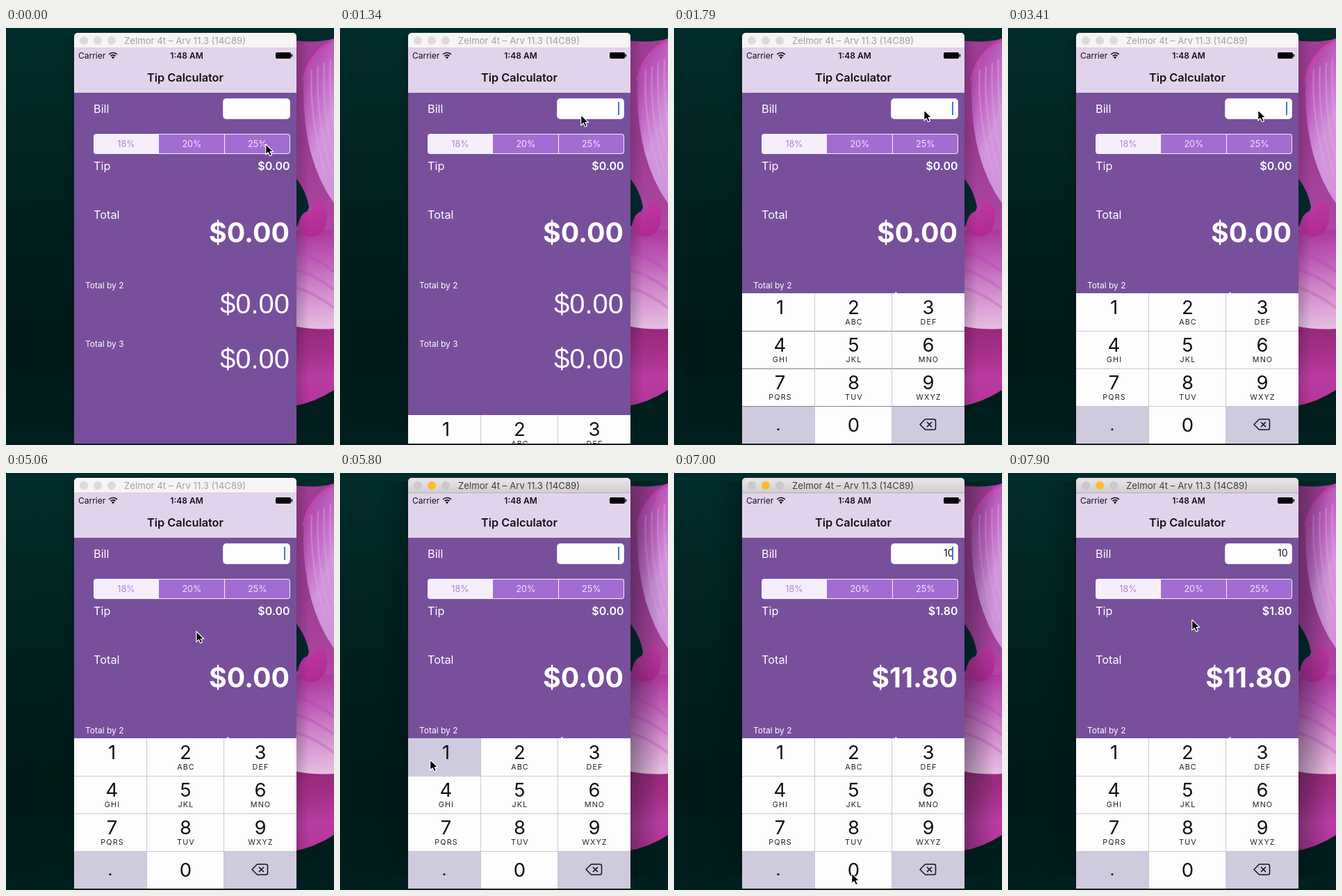
Write an HTML page with a canvas that moves like this. It is 472 by 599 pixels and loops after 8000 ms.

```html
<!DOCTYPE html>
<html lang="en">
<head>
<meta charset="utf-8">
<title>Tip Calculator</title>
<style>
  html, body { margin: 0; width: 100%; height: 100%; overflow: hidden; background: #001c1b; }
  canvas { display: block; width: 472px; height: 599px; }
</style>
</head>
<body>
<canvas id="stage"></canvas>
<script>
const W = 472, H = 599, LOOP = 8000, TICK = 148.9;
const LEFT = 98, WIDTH = 320, BOTTOM = 597;
const SANS = 'Inter, sans-serif';
const INK = '#151217', KEY_GREY = '#cfcade';

const FOCUS = 1229, ACTIVATE = 5490, PRESS_ONE = 5780, TYPE_ONE = 5930, PRESS_ZERO = 6820, TYPE_ZERO = 6970;
const CARET_START = 1950, CARET_PERIOD = 960, SLIDE = 400;

const canvas = document.getElementById('stage');
const ratio = window.devicePixelRatio || 1;
canvas.width = W * ratio;
canvas.height = H * ratio;
const ctx = canvas.getContext('2d');

const clamp = v => Math.min(1, Math.max(0, v));
const smooth = v => { const u = clamp(v); return u * u * (3 - 2 * u); };

// Each glide ends at a resting place; bend pushes its middle sideways.
const home = { x: 373, y: 166 };
const glides = [
  { from: 450, to: 1040, x: 346, y: 124, bend: -12 },
  { from: 1340, to: 1790, x: 359, y: 117, bend: 0 },
  { from: 4760, to: 5490, x: 129, y: 411, bend: 0 },
  { from: 6100, to: 6700, x: 255, y: 574, bend: 0 },
  { from: 7000, to: 7860, x: 264, y: 210, bend: -20 }
];

function cursorAt(t) {
  let { x, y } = home;
  for (const g of glides) {
    const u = smooth((t - g.from) / (g.to - g.from));
    x += (g.x - x) * u + g.bend * Math.sin(Math.PI * u);
    y += (g.y - y) * u;
  }
  return { x, y };
}

function caretVisible(t) {
  if (t < FOCUS) return false;
  const since = [CARET_START, TYPE_ONE, TYPE_ZERO].filter(r => r <= t).pop() ?? t;
  return (t - since) / CARET_PERIOD % 1 < .55;
}

function rect(x, y, w, h, fill) {
  ctx.fillStyle = fill;
  ctx.fillRect(x, y, w, h);
}

function round(x, y, w, h, r, fill) {
  ctx.beginPath();
  ctx.roundRect(x, y, w, h, r);
  ctx.fillStyle = fill;
  ctx.fill();
}

function disc(x, y, r, fill) {
  ctx.beginPath();
  ctx.arc(x, y, r, 0, Math.PI * 2);
  ctx.fillStyle = fill;
  ctx.fill();
}

function shape(path, fill, stroke, width = 1) {
  const p = new Path2D(path);
  if (fill) { ctx.fillStyle = fill; ctx.fill(p); }
  if (stroke) { ctx.strokeStyle = stroke; ctx.lineWidth = width; ctx.stroke(p); }
}

function gradient(x0, y0, x1, y1, ...colors) {
  const g = ctx.createLinearGradient(x0, y0, x1, y1);
  colors.forEach((c, i) => g.addColorStop(i / (colors.length - 1), c));
  return g;
}

function text(str, x, y, size, { align = 'left', weight = 400, color = '#fff', family = SANS, spacing = 0 } = {}) {
  ctx.font = `${weight} ${size}px ${family}`;
  ctx.textAlign = align;
  ctx.fillStyle = color;
  ctx.letterSpacing = spacing + 'px';
  ctx.fillText(str, x, y);
}

function drawBackdrop() {
  rect(0, 0, W, H, gradient(0, 0, 30, H, '#012c2b', '#012523', '#011f1d', '#001a18', '#001f1e'));

  // Upper petal with a paler fold
  shape('M414 18Q450 22 472 15V310H414Z', gradient(418, 20, 440, 300, '#a03c94', '#9c3a90', '#b048a4'));
  shape('M472 16Q428 36 428 90Q428 190 472 252Z', gradient(428, 90, 474, 110, '#b550b2', '#c46bc6', '#cf94da'));
  shape('M472 17Q436 36 428 76', null, '#c544b0', 4);
  for (let i = 0; i < 4; i++) {
    const x = 440 + i * 9;
    shape(`M${x} ${60 - i * 5}Q${x - 4} 130 ${x + 20} 210`, null, 'rgba(225,165,228,.4)', 2.5);
  }

  // Lower petals
  shape('M414 290H472V436H414Z', gradient(424, 290, 444, 430, '#a9349a', '#bf5cb8', '#d28fcc', '#e5bcdf'));
  shape('M414 428Q442 434 472 432V520Q444 538 414 543Z',
    gradient(430, 430, 440, 540, '#96287a', '#a42f88', '#ba3ca2', '#b4349a'));
  for (let i = 0; i < 3; i++) {
    const y = 320 + i * 26;
    shape(`M414 ${y}Q444 ${y + 8} 472 ${y + 30}`, null, 'rgba(170,60,160,.25)', 4);
  }

  shape('M414 212Q432 232 436 258Q426 282 414 288Z', '#03282b');
  shape('M420 284Q424 262 440 262Q452 236 462 262Q464 290 448 298Q428 306 420 284Z',
    gradient(425, 250, 445, 300, '#c23aa4', '#ae2a92'));
}

function drawShadow(active) {
  const reach = active ? 44 : 18, dark = `rgba(0,14,18,${active ? .34 : .18})`;
  for (const [edge, dir] of [[LEFT, -1], [LEFT + WIDTH, 1]]) {
    const far = edge + dir * reach;
    rect(Math.min(edge, far), 12, reach, 568, gradient(edge, 0, far, 0, dark, 'rgba(0,14,18,0)'));
  }
}

function drawTitleBar(active) {
  round(LEFT, 7, WIDTH, 22, [5, 5, 0, 0],
    active ? gradient(0, 7, 0, 28, '#e9e7e9', '#d0ced0') : '#f6f5f6');
  for (let i = 0; i < 3; i++) {
    disc(112 + i * 20, 18, 6, !active ? '#dcdadc' : i === 1 ? '#fdbb2d' : '#cbc8cb');
  }
  text('Zelmor 4t – Arv 11.3 (14C89)', 257.5, 22.5, 13.2,
    { align: 'center', color: active ? '#3f3d40' : '#a3a1a4' });
}

function drawNavigation(active) {
  rect(LEFT, 28, WIDTH, 65, '#e2d3ec');
  rect(LEFT, 28, WIDTH, 1, active ? '#b3acb6' : '#d9d0de');
  rect(LEFT, 93, WIDTH, 1, '#775a93');
  text('Carrier', 104, 44, 12, { color: INK });
  ctx.lineWidth = 1.7;
  ctx.strokeStyle = INK;
  for (const r of [4.6, 8]) {
    ctx.beginPath();
    ctx.arc(154, 43.5, r, -Math.PI * .76, -Math.PI * .24);
    ctx.stroke();
  }
  shape('M154 44.5L151.8 41.8Q154 40.2 156.2 41.8Z', INK);
  text('1:48 AM', 260, 44, 12, { align: 'center', weight: 600, color: INK });
  round(388, 35, 22, 9, 2, '#050505');
  round(410.5, 37.5, 1.7, 4, 1, '#050505');
  text('Tip Calculator', 258, 77, 16.3, { align: 'center', weight: 600, color: INK });
}

function drawSegments() {
  round(126, 152, 283, 29, 4, '#f6effb');
  rect(220, 153, 94, 27, '#a26dd2');
  round(315, 153, 93, 27, [0, 3, 3, 0], '#a26dd2');
  ['18%', '20%', '25%'].forEach((label, i) =>
    text(label, 173 + i * 94.4, 171, 12.6, { align: 'center', color: i ? '#f1e4fb' : '#b083dd' }));
}

function drawForm(bill, caretOn) {
  const tip = Number(bill) * .18, total = Number(bill) + tip;
  const money = v => '$' + v.toFixed(2);
  const light = { align: 'right', family: '"Liberation Sans", Arial, sans-serif' };

  rect(LEFT, 94, WIDTH, 503, '#774f9b');
  text('Bill', 126, 122, 16.3);
  text('Tip', 126, 204, 16.3);
  text('Total', 126, 274, 16.3);
  text(money(tip), 408.5, 204, 16, { align: 'right', weight: 600 });
  text(money(total), 408, 308, 39.3, { align: 'right', weight: 700 });
  [2, 3].forEach((people, i) => {
    text('Total by ' + people, 114, 374 + i * 84, 12);
    text(money(total / people), 408, 410 + i * 79, 40, light);
  });

  round(312, 101, 97, 30, 5, '#d3cad9');
  round(312.6, 101.6, 95.8, 28.8, 4.5, '#fdfdfd');
  text(bill, 402.5, 120, 14, { align: 'right', color: INK });
  if (caretOn) rect(400, 106, 2, 19, '#4a72d6');
  drawSegments();
}

function drawBackspace(x, y) {
  ctx.save();
  ctx.translate(x, y);
  ctx.lineJoin = ctx.lineCap = 'round';
  shape('M1 8.5L8.5 1H21Q23.5 1 23.5 3.5V13.5Q23.5 16 21 16H8.5Z', null, INK, 1.5);
  shape('M11.5 5.5L17.5 11.5M17.5 5.5L11.5 11.5', null, INK, 1.7);
  ctx.restore();
}

function drawKeyboard(top, pressed, lineColor) {
  const keys = ['1', '2 ABC', '3 DEF', '4 GHI', '5 JKL', '6 MNO', '7 PQRS', '8 TUV', '9 WXYZ', '.', '0', 'del'];
  const columns = [LEFT, 203, 314, LEFT + WIDTH], pitch = 54;

  rect(LEFT, top, WIDTH, BOTTOM - top, '#fdfdfe');
  keys.forEach((key, i) => {
    const [label, letters = ''] = key.split(' ');
    const col = i % 3, x = columns[col], w = columns[col + 1] - x, y = top + Math.floor(i / 3) * pitch;
    const mid = x + w / 2 + (col ? 0 : 2);
    const special = label === '.' || label === 'del';
    if (special || label === pressed) rect(x, y, w, pitch, KEY_GREY);
    if (label === 'del') drawBackspace(353, y + 18);
    else if (label === '.') disc(150, y + 33.5, 1.6, INK);
    else text(label, mid, y + (label === '0' ? 36.5 : 29.5), 27.5, { align: 'center', color: INK });
    text(letters, mid + .5, y + 44.7, 10.8, { align: 'center', color: '#242127', spacing: 1.1 });
  });
  for (let r = 1; r < 4; r++) rect(LEFT, top + r * pitch, WIDTH, 1, lineColor);
  for (const x of columns.slice(1, 3)) rect(x - 1, top, 1, BOTTOM - top, '#cbc9cf');
}

function drawCursor({ x, y }) {
  ctx.save();
  ctx.translate(x + .7, y + .8);
  ctx.lineJoin = 'round';
  shape('M0 0V15.2L3.5 11.9L5.9 17L8.7 15.8L6.4 10.8H11Z', '#000', '#fff', 1.2);
  ctx.restore();
}

function render(ms) {
  const t = Math.floor((ms + 20) / TICK) * TICK;
  const within = (a, b) => t >= a && t < b;
  const active = t >= ACTIVATE;
  const bill = t >= TYPE_ZERO ? '10' : t >= TYPE_ONE ? '1' : '';
  const pressed = within(PRESS_ONE, TYPE_ONE) ? '1' : within(PRESS_ZERO, TYPE_ZERO) ? '0' : '';
  const top = BOTTOM - 216 * smooth((t - FOCUS) / SLIDE);

  ctx.setTransform(ratio, 0, 0, ratio, 0, 0);
  drawBackdrop();
  drawShadow(active);
  drawTitleBar(active);
  drawNavigation(active);
  ctx.save();
  ctx.beginPath();
  ctx.rect(LEFT, 94, WIDTH, BOTTOM - 94);
  ctx.clip();
  drawForm(bill, caretVisible(t));
  if (t > FOCUS) drawKeyboard(Math.round(top), pressed, t < 2000 ? '#85828a' : '#cbc9cf');
  ctx.restore();
  drawCursor(cursorAt(t));
}

const start = performance.now();
function loop() {
  render((performance.now() - start) % LOOP);
  requestAnimationFrame(loop);
}
loop();
</script>
</body>
</html>
```
